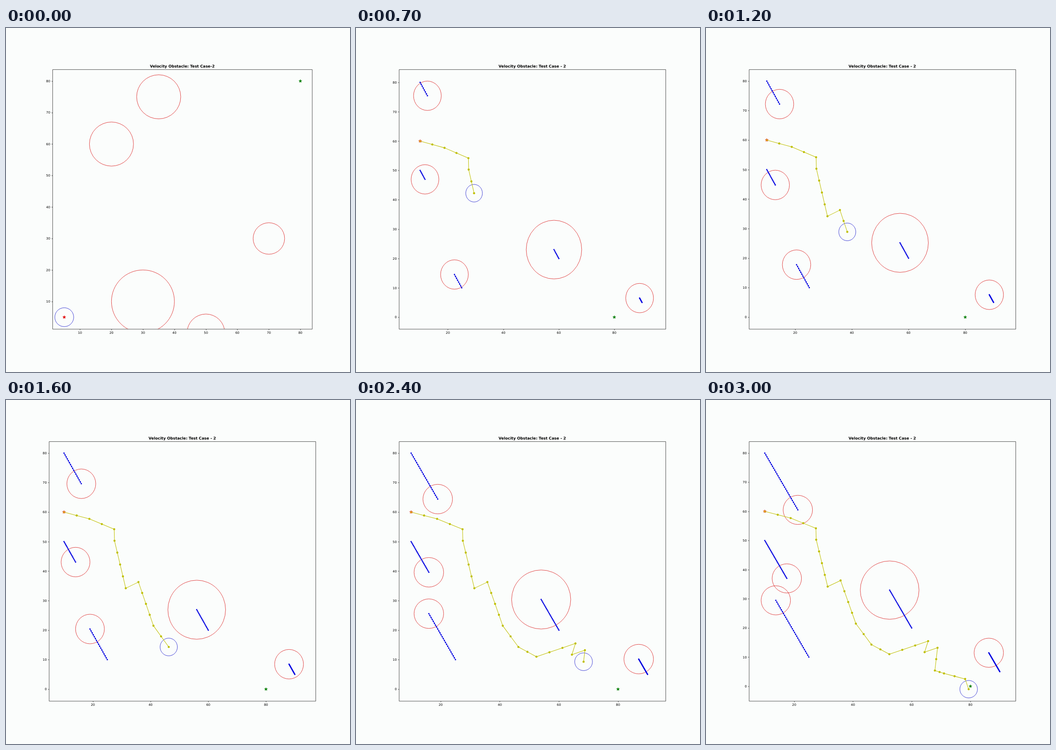
Write an HTML page that moves like this. It is 748 by 748 pixels and loops after 3.1 s.

```html
<!DOCTYPE html>
<html lang="en">
<head>
<meta charset="utf-8">
<title>Velocity Obstacle</title>
<style>
html, body { margin: 0; width: 100%; height: 100%; overflow: hidden; background: #fbfdfc; }
svg { width: 100%; height: 100%; display: block; }
text { font-family: "DejaVu Sans", sans-serif; fill: #000; text-rendering: geometricPrecision; }
</style>
</head>
<body>
<svg viewBox="0 0 748 748">
  <defs><clipPath id="clip"><rect id="area"/></clipPath></defs>
  <g id="plot" clip-path="url(#clip)"></g>
  <g id="axes"></g>
</svg>
<script>
const PT = 748 / 1080;
const TOP = 89.76, BOTTOM = 654.5, MID = 383.35;
const RED = '#da1616', BLUE = '#1616cc', TRAIL = '#0000e0', OLIVE = '#bfbf00', GREEN = '#007c00';
const STEP = 100, COUNT = 31, PACE = 4.2;

// corners of the robot's route; each leg is walked in even steps of about PACE
const corners = [
  [10, 60], [18.8, 57.7], [27.4, 54.2], [27.5, 50.3], [31.4, 34.2], [35.8, 36.3],
  [41, 21.5], [46.3, 14.3], [52.4, 11], [65.6, 15.5], [64.4, 11.7], [68.8, 13.2],
  [67.9, 5.4], [69.5, 4.9], [71, 4.4], [78.2, 2.5], [79.4, -1]
];
// x, y, radius, signed speed along the -60 degree direction
const movers = [[10, 80, 5, .75], [10, 50, 5, .5], [25, 10, 5, -.75], [60, 20, 10, -.5], [90, 5, 5, -.25]];
const still = [[35, 75, 7], [20, 60, 7], [70, 30, 5], [30, 10, 10], [50, 0, 6]];

const $ = id => document.getElementById(id);
const n = v => v.toFixed(2);
const list = (count, f) => Array.from({ length: count }, (_, i) => f(i));
const tens = (a, b, step = 10) => list((b - a) / step + 1, i => a + i * step);
const snap = v => (Math.floor(v / PT + .5) + .5) * PT;
const at = ([x, y, , v], k) => [x + v * k / 2, y - v * k * Math.sqrt(3) / 2];

function walk(points) {
  const out = [points[0]];
  points.slice(1).forEach(([x, y], i) => {
    const [px, py] = points[i];
    const steps = Math.max(1, Math.round(Math.hypot(x - px, y - py) / PACE));
    for (let j = 1; j <= steps; j++) out.push([px + (x - px) * j / steps, py + (y - py) * j / steps]);
  });
  return out;
}
const path = walk(corners);

function span(a) {
  const lo = Math.min(...a), hi = Math.max(...a), m = (hi - lo) * .05;
  return [lo - m, hi + m];
}

function scale(width, xs, ys) {
  const left = MID - width / 2, right = MID + width / 2;
  const [x0, x1] = span(xs), [y0, y1] = span(ys);
  const sx = width / (x1 - x0), sy = (BOTTOM - TOP) / (y1 - y0);
  return { left, right, sx, sy, x: v => left + (v - x0) * sx, y: v => BOTTOM - (v - y0) * sy };
}

const ring = (s, [x, y], r, color) =>
  `<ellipse cx="${n(s.x(x))}" cy="${n(s.y(y))}" rx="${n(r * s.sx)}" ry="${n(r * s.sy)}" fill="none" stroke="${color}" stroke-width=".8"/>`;

const dot = (s, [x, y], r, color) =>
  `<circle cx="${n(s.x(x))}" cy="${n(s.y(y))}" r="${r}" fill="${color}"/>`;

function star(s, [x, y], color) {
  const pts = list(10, i => {
    const r = 5 * PT * (i % 2 ? .382 : 1), a = i * Math.PI / 5;
    return n(s.x(x) + r * Math.sin(a)) + ',' + n(s.y(y) - r * Math.cos(a));
  });
  return `<polygon points="${pts.join(' ')}" fill="${color}" stroke="${color}" stroke-width="${n(PT)}" stroke-linejoin="bevel"/>`;
}

function chain(s, pts, r, color) {
  const line = pts.map(([x, y]) => n(s.x(x)) + ',' + n(s.y(y))).join(' ');
  return `<polyline points="${line}" fill="none" stroke="${color}" stroke-width="1.05" stroke-linejoin="round"/>` +
    pts.map(p => dot(s, p, r, color)).join('');
}

function axes(s, xt, yt, title) {
  const size = n(10 * PT), len = 3.5 * PT;
  const l = snap(s.left), b = snap(BOTTOM);
  let d = `M${n(l)} ${n(snap(TOP))}H${n(snap(s.right))}V${n(b)}H${n(l)}Z`, labels = '';
  for (const v of xt) {
    d += `M${n(snap(s.x(v)))} ${n(b)}v${n(len)}`;
    labels += `<text x="${n(s.x(v))}" y="664.6" font-size="${size}" text-anchor="middle">${v}</text>`;
  }
  for (const v of yt) {
    d += `M${n(l)} ${n(snap(s.y(v)))}h${n(-len)}`;
    labels += `<text x="${n(s.left - 2 * len)}" y="${n(s.y(v) + 2.6)}" font-size="${size}" text-anchor="end">${v}</text>`;
  }
  return `<path d="${d}" fill="none" stroke="#000" stroke-width="${n(PT)}"/>${labels}` +
    `<text x="${MID}" y="86" font-size="${n(12 * PT)}" font-weight="bold" text-anchor="middle">${title}</text>`;
}

function opening() {
  const s = scale(BOTTOM - TOP, [5, 80], [5, 80]);
  const body = still.map(c => ring(s, c, c[2], RED)).join('') +
    ring(s, [5, 5], 3, BLUE) + star(s, [5, 5], '#e00000') + star(s, [80, 80], GREEN);
  return [s, body, axes(s, tens(10, 80), tens(10, 80), 'Velocity Obstacle: Test Case-2')];
}

function run(k) {
  const trod = path.slice(0, k + 1), goal = [80, 0];
  const seen = [goal, ...movers, ...trod];
  movers.forEach(m => {
    const [x, y] = at(m, k), r = m[2];
    seen.push([x - r, y - r], [x + r, y + r]);
  });
  const s = scale(579.7, seen.map(p => p[0]), seen.map(p => p[1]));
  const body = movers.map(m => ring(s, at(m, k), m[2], RED)).join('') +
    ring(s, path[k], 3, BLUE) +
    movers.map(m => chain(s, list(k + 1, i => at(m, i)), 1.45, TRAIL)).join('') +
    chain(s, trod, 2.3, OLIVE) +
    star(s, path[0], '#d02c14') + dot(s, path[0], 1.9, '#e8a820') + star(s, goal, GREEN);
  return [s, body, axes(s, tens(20, 80, 20), tens(0, 80), 'Velocity Obstacle: Test Case - 2')];
}

let shown = -1;
function draw(ms) {
  const k = Math.floor(ms / STEP) % COUNT;
  if (k === shown) return;
  shown = k;
  const [s, body, frame] = k ? run(k) : opening();
  const box = { x: s.left, y: TOP, width: s.right - s.left, height: BOTTOM - TOP };
  for (const key in box) $('area').setAttribute(key, box[key]);
  $('plot').innerHTML = body;
  $('axes').innerHTML = frame;
}

const start = performance.now();
function tick() {
  draw(performance.now() - start);
  requestAnimationFrame(tick);
}
tick();
</script>
</body>
</html>
```
